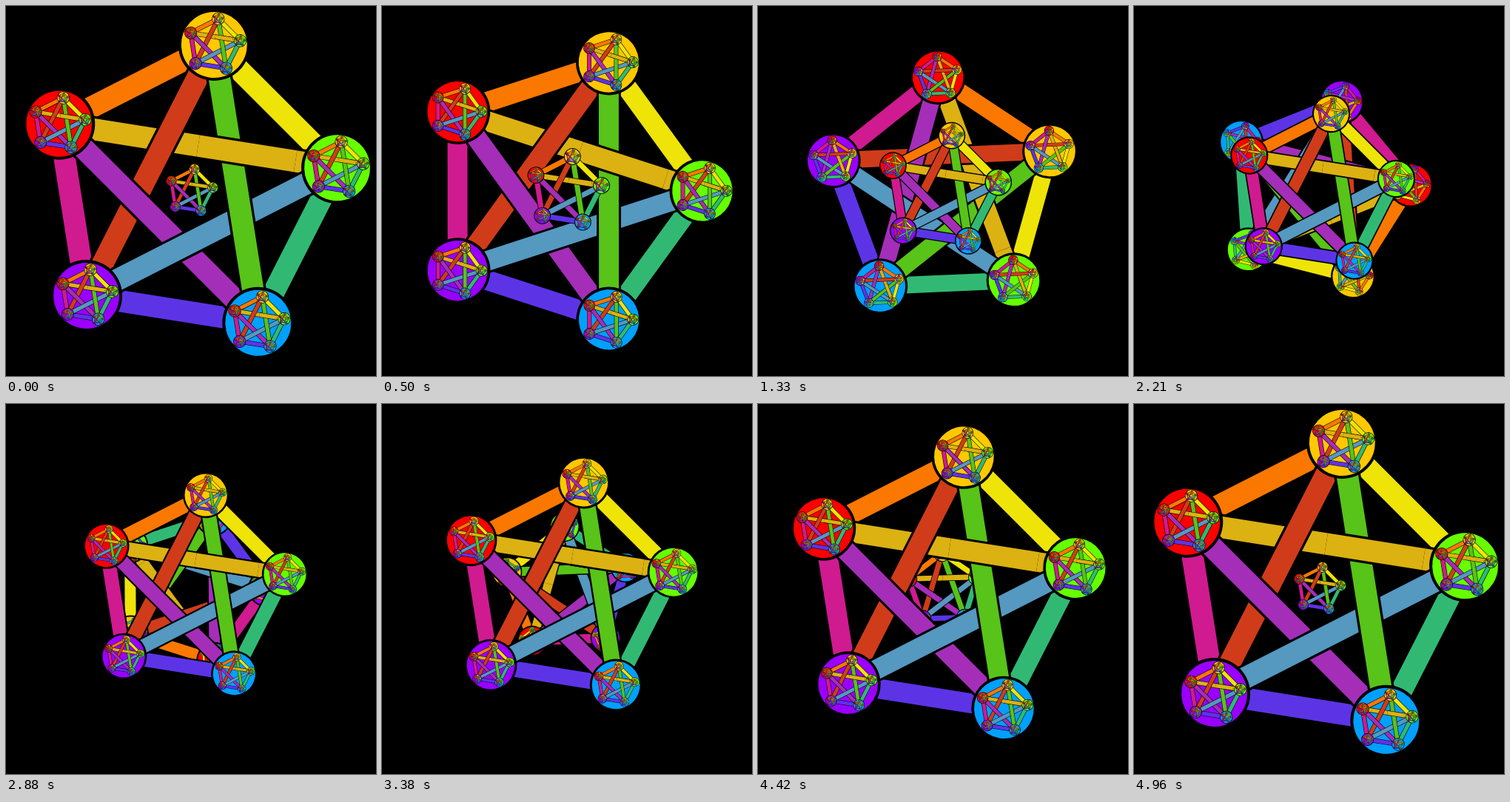
These frames come from a looping animation (500x500 px, 5 s). An HTML page with a canvas:

```html
<!DOCTYPE html>
<html lang="en">
<head>
<meta charset="utf-8">
<title>Nested pentagons</title>
<style>
  html, body { margin: 0; width: 100%; height: 100%; overflow: hidden; background: #000; }
  canvas { display: block; width: 500px; height: 500px; }
</style>
</head>
<body>
<canvas id="stage" width="500" height="500"></canvas>
<script>
const ctx = document.getElementById('stage').getContext('2d');

const LOOP = 5000, FRAMES = 120;
const BIG = 200, SMALL = 30;
const TAU = Math.PI * 2;
const TILT = TAU / 40;

// Proportions relative to the radius of one figure
const DISK = 0.2225, RING = 0.2425, BAR = 0.147, OUTLINE = 0.18, CHILD = 0.178;

const diskColors = ['#ff0000', '#ffc800', '#66ff00', '#00a0ff', '#9900ff'];

// Vertex 1 (yellow) sits at the top before tilting
const points = diskColors.map((_, i) => {
  const a = (i - 1) * TAU / 5;
  return [Math.sin(a), -Math.cos(a)];
});

// Rim first, then diagonals from lowest to highest
const bars = [
  [0, 1, '#fa7800'], [1, 2, '#eee408'], [2, 3, '#31b974'],
  [3, 4, '#5c34e6'], [4, 0, '#d01a90'],
  [0, 2, '#dcb112'], [4, 1, '#d03c1a'], [3, 0, '#a42eb8'],
  [2, 4, '#5598c0'], [1, 3, '#58c318']
];

function drawBar([a, b, color], from = 0, to = 1) {
  const [ax, ay] = points[a], [bx, by] = points[b];
  const dx = bx - ax, dy = by - ay;
  ctx.beginPath();
  ctx.moveTo(ax + dx * from, ay + dy * from);
  ctx.lineTo(ax + dx * to, ay + dy * to);
  ctx.strokeStyle = '#000';
  ctx.lineWidth = OUTLINE;
  ctx.stroke();
  ctx.strokeStyle = color;
  ctx.lineWidth = BAR;
  ctx.stroke();
}

function drawDisk(x, y, r, color) {
  ctx.beginPath();
  ctx.arc(x, y, r, 0, TAU);
  ctx.fillStyle = color;
  ctx.fill();
}

function drawFigure(radius) {
  for (const bar of bars) drawBar(bar);
  drawBar(bars[5], 0.5, 0.85); // closes the cyclic weave

  points.forEach(([x, y], i) => {
    drawDisk(x, y, RING, '#000');
    drawDisk(x, y, DISK, diskColors[i]);
    if (radius * CHILD < 0.9) return;
    ctx.save();
    ctx.translate(x, y);
    ctx.scale(CHILD, CHILD);
    drawFigure(radius * CHILD);
    ctx.restore();
  });
}

function place(radius, angle) {
  ctx.save();
  ctx.translate(250, 250);
  ctx.rotate(angle);
  ctx.scale(radius, radius);
  drawFigure(radius);
  ctx.restore();
}

function render(frame) {
  const u = frame / (FRAMES - 1);
  const span = (BIG - SMALL) * u;
  ctx.fillStyle = '#000';
  ctx.fillRect(0, 0, 500, 500);
  place(BIG - span, TILT + Math.PI * (1 - Math.cos(Math.PI * u)));
  place(SMALL + span, TILT);
}

let shown = -1;
function tick() {
  // Frame starts are rounded to 10 ms, hence the small lead
  const frame = Math.floor((performance.now() + 4) * FRAMES / LOOP) % FRAMES;
  if (frame !== shown) render(shown = frame);
  requestAnimationFrame(tick);
}
tick();
</script>
</body>
</html>
```
